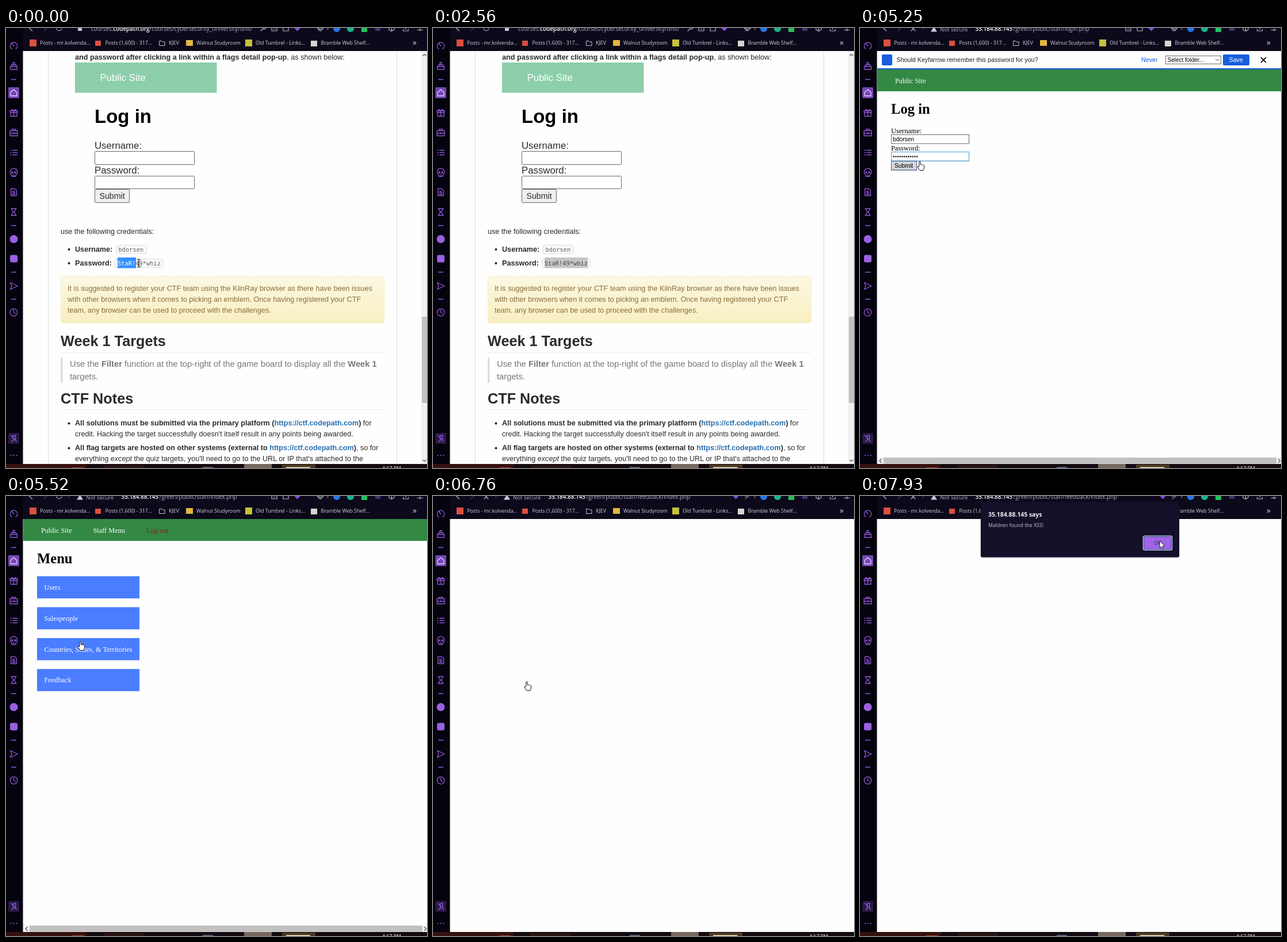
Recreate the animation shown at these times as an HTML page. Size 732x765 px, loop 8000 ms.

```html
<!DOCTYPE html>
<html lang="en">
<head>
<meta charset="utf-8">
<title>Login walkthrough</title>
<style>
html,body{margin:0;width:100%;height:100%;overflow:hidden;background:#fff}
svg{display:block}
.s{font-family:"Liberation Sans",Arial,sans-serif;font-size:12.63px}
.t{font-family:"Liberation Serif",Times,serif;font-size:12.3px}
.o{font-family:"Open Sans",sans-serif;font-size:8.8px}
.m{font-family:"DejaVu Sans Mono",monospace;font-size:10.4px}
.b{font-weight:700}
.h{font-size:25.26px;font-weight:700}
.link{fill:#2a6fb0;font-weight:700}
.line{fill:none;stroke-linecap:round;stroke-linejoin:round}
.box{fill:#fff;stroke:#6a6a6a}

/* Hard switches: one 8 s loop, percent = ms / 80 */
.a{animation:8s step-end infinite}
.course{animation-name:course}
.blue{animation-name:blue}
.gray{animation-name:gray}
.insecure{animation-name:insecure}
.login{animation-name:login}
.shift{animation-name:shift}
.bar{animation-name:bar}
.caret{animation-name:caret}
.focus{animation-name:focus}
.sent{animation-name:sent}
.dots{animation-name:dots}
.menu{animation-name:menu}
.site{animation-name:site}
.early{animation-name:early}
.late{animation-name:late}
.hover1{animation-name:hover1}
.hover2{animation-name:hover2}
.idle{animation-name:idle}
.busy{animation-name:busy}
.press{animation-name:press}
.ibeam{animation-name:ibeam}
.arrow{animation-name:arrow}
.hand{animation-name:hand}
@keyframes course{0%{opacity:1}32.75%,100%{opacity:0}}
@keyframes blue{0%{opacity:1}32%,100%{opacity:0}}
@keyframes gray{0%{opacity:0}32%,100%{opacity:1}}
@keyframes insecure{0%{opacity:0}32.75%,100%{opacity:1}}
@keyframes login{0%{opacity:0}32.75%{opacity:1}68.5%,100%{opacity:0}}
@keyframes shift{0%{transform:none}59.625%,100%{transform:translateY(32px)}}
@keyframes bar{0%{opacity:0}60.5%,100%{opacity:1}}
@keyframes caret{0%{opacity:0}42%{opacity:1}48.625%,100%{opacity:0}}
@keyframes focus{0%{opacity:0}42%{opacity:1}58.75%,100%{opacity:0}}
@keyframes sent{0%{opacity:0}58.75%,100%{opacity:1}}
@keyframes dots{0%{opacity:0}50.375%,100%{opacity:1}}
@keyframes menu{0%{opacity:0}68.5%{opacity:1}84.5%,100%{opacity:0}}
@keyframes site{0%{opacity:0}32.75%{opacity:1}84.5%,100%{opacity:0}}
@keyframes early{0%{opacity:1}84.5%,100%{opacity:0}}
@keyframes late{0%{opacity:0}84.5%,100%{opacity:1}}
@keyframes hover1{0%{opacity:0}69.5%{opacity:1}73.75%,100%{opacity:0}}
@keyframes hover2{0%{opacity:0}73.75%,100%{opacity:1}}
@keyframes idle{0%{opacity:1}59.625%{opacity:0}68.5%{opacity:1}84.5%,100%{opacity:0}}
@keyframes busy{0%{opacity:0}59.625%{opacity:1}68.5%{opacity:0}84.5%,100%{opacity:1}}
@keyframes press{0%{opacity:0}98%,100%{opacity:1}}
@keyframes ibeam{0%{opacity:1}15.9%{opacity:0}41.25%{opacity:1}54.4%,100%{opacity:0}}
@keyframes arrow{0%{opacity:0}15.9%{opacity:1}41.25%{opacity:0}88.5%,100%{opacity:1}}
@keyframes hand{0%{opacity:0}54.4%{opacity:1}88.5%,100%{opacity:0}}

/* Continuous motion */
#sel{animation:drag 8s infinite}
@keyframes drag{
  0%{clip-path:inset(0 43.8px 0 0)}
  1%{clip-path:inset(0 43.8px 0 0);animation-timing-function:steps(7,start)}
  6.6875%,100%{clip-path:inset(0 0 0 0)}
}
#dialog{animation:drop 8s linear infinite}
@keyframes drop{
  0%,85.375%{opacity:0;transform:translateY(-20px)}
  87.125%{opacity:.84;transform:translateY(-3px)}
  88%,100%{opacity:1;transform:translateY(0)}
}
#cursor{animation:move 8s linear infinite}
@keyframes move{
  0%,1%{transform:translate(231px,409px)}
  5.875%,8.25%{transform:translate(270px,411px)}
  10.75%,14.875%{transform:translate(271px,412px)}
  20.125%,23.5%{transform:translate(466px,253px)}
  26.875%,36.12%{transform:translate(551px,-20px)}
  36.125%{transform:translate(475px,4px)}
  42%,50.375%{transform:translate(151px,198px)}
  57.5%,62.25%{transform:translate(92px,205px)}
  65.625%,66.4%{transform:translate(104px,231px)}
  68.5%{transform:translate(125px,250px)}
  71.625%{transform:translate(150px,262px)}
  76.125%,77%{transform:translate(176px,327px)}
  80.25%,88%{transform:translate(163px,322px)}
  92.375%,93.125%{transform:translate(392px,160px)}
  99.125%,100%{transform:translate(521px,78px)}
}
</style>
</head>
<body>
<svg width="732" height="765" viewBox="0 0 732 765">
<defs>
  <linearGradient id="alert" x2="0" y2="1"><stop stop-color="#fcf8e3"/><stop offset="1" stop-color="#f8efc0"/></linearGradient>
</defs>
<rect width="732" height="765" fill="#fefefe"/>

<!-- Course page -->
<g class="a course s" fill="#2b2b2b">
  <path d="M73.5 40V758M679.5 40V758" stroke="#ddd"/>
  <text class="b" x="120" y="54.5">and password after clicking a link within a flags detail pop-up<tspan font-weight="400">, as shown below:</tspan></text>
  <rect x="120" y="60" width="246.5" height="52.5" fill="#8dceab"/>
  <text x="163.5" y="92" font-size="16.8" fill="#fff">Public Site</text>
  <text class="b" x="154" y="164.5" font-size="33" fill="#000">Log in</text>
  <g font-size="16.8">
    <text x="154" y="210">Username:</text>
    <text x="154" y="253">Password:</text>
    <rect class="box" x="154.5" y="214.5" width="173" height="23" rx="1"/>
    <rect class="box" x="154.5" y="257.5" width="173" height="22" rx="1"/>
    <rect x="154.5" y="280.5" width="60" height="23" rx="1" fill="#efefef" stroke="#666"/>
    <text x="162.5" y="296.5" font-size="14.2">Submit</text>
  </g>
  <text x="95" y="357.5">use the following credentials:</text>
  <g fill="#222">
    <circle cx="109.5" cy="385" r="2"/><circle cx="109.5" cy="409" r="2"/>
    <circle cx="109.5" cy="687.5" r="2"/><circle cx="109.5" cy="730.5" r="2"/>
  </g>
  <text class="b" x="120" y="389">Username:</text>
  <text class="b" x="120" y="413">Password:</text>
  <g fill="#f9f9f9" stroke="#ddd">
    <rect x="191.5" y="377.5" width="53" height="15" rx="2"/>
    <rect x="189.5" y="401.5" width="84" height="15" rx="2"/>
  </g>
  <g class="m" fill="#666">
    <text x="195.5" y="389">bdorsen</text>
    <text x="194" y="413">StaR!49*whiz</text>
    <g class="a blue"><g id="sel">
      <rect x="194" y="399" width="75.2" height="18.5" fill="#338fff"/>
      <text x="194" y="413" fill="#fff">StaR!49*whiz</text>
    </g></g>
    <g class="a gray">
      <rect x="194" y="399" width="75.2" height="18.5" fill="#c6c6c6"/>
      <text x="194" y="413" fill="#444">StaR!49*whiz</text>
    </g>
  </g>
  <rect x="95.5" y="431.5" width="562" height="81.5" rx="3" fill="url(#alert)" stroke="#f9efc6"/>
  <g fill="#8a6d3b">
    <text x="107" y="457">It is suggested to register your CTF team using the KilnRay browser as there have been issues</text>
    <text x="107" y="476">with other browsers when it comes to picking an emblem. Once having registered your CTF</text>
    <text x="107" y="494.5">team, any browser can be used to proceed with the challenges.</text>
  </g>
  <text class="h" x="95" y="553">Week 1 Targets</text>
  <text class="h" x="95" y="653">CTF Notes</text>
  <path d="M95 564.5H658M95 663.5H658" stroke="#eee"/>
  <rect x="95" y="573" width="3.5" height="44" fill="#ddd"/>
  <g font-size="14.74" fill="#777">
    <text x="111" y="588.5">Use the <tspan class="b">Filter</tspan> function at the top-right of the game board to display all the <tspan class="b">Week 1</tspan></text>
    <text x="111" y="610.5">targets.</text>
  </g>
  <text x="120" y="691"><tspan class="b">All solutions must be submitted via the primary platform (<tspan class="link">https://ctf.codepath.com</tspan>)</tspan> for</text>
  <text x="120" y="709.5">credit. Hacking the target successfully doesn't itself result in any points being awarded.</text>
  <text x="120" y="734"><tspan class="b">All flag targets are hosted on other systems (external to <tspan class="link">https://ctf.codepath.com</tspan>)</tspan>, so for</text>
  <text x="120" y="752.5">everything <tspan font-style="italic">except</tspan> the quiz targets, you'll need to go to the URL or IP that's attached to the</text>
  <rect x="722" y="40" width="10" height="718" fill="#f1f1f1"/>
  <rect x="723" y="502" width="9" height="150" fill="#c1c1c1"/>
  <path class="line" d="M725 48l2.5-2.5 2.5 2.5M725 751l2.5 2.5 2.5-2.5" stroke="#555" stroke-width="1.3"/>
</g>

<!-- Login page -->
<g class="a login t">
  <g class="a bar s" style="font-size:10.7px">
    <rect x="30" y="70" width="702" height="2" fill="#175ddc"/>
    <rect x="38" y="46" width="18" height="19" rx="2" fill="#175ddc"/>
    <text x="63.5" y="59" fill="#222">Should Keyfarrow remember this password for you?</text>
    <text x="489" y="59" fill="#175ddc">Never</text>
    <rect class="box" x="531.5" y="48.5" width="96" height="14"/>
    <text x="534.5" y="59" font-size="10">Select folder...</text>
    <path class="line" d="M618.5 54l2.5 2.5 2.5-2.5" stroke="#333"/>
    <rect x="631" y="46" width="46" height="19" rx="2" fill="#175ddc"/>
    <text x="641.5" y="59" fill="#fff">Save</text>
    <path d="M697 51l9 9M706 51l-9 9" stroke="#222" stroke-width="2"/>
  </g>
  <g class="a shift">
    <rect x="30" y="40" width="702" height="38" fill="#384"/>
    <text x="61" y="64" fill="#fff">Public Site</text>
    <text class="b" x="54" y="117" font-size="24.6">Log in</text>
    <text x="54" y="150.5">Username:</text>
    <text x="54" y="180.5">Password:</text>
    <rect class="box" x="54.5" y="153.5" width="135" height="15.5"/>
    <rect class="box" x="54.5" y="183.5" width="135" height="15.5"/>
    <rect x="54.5" y="199.5" width="44" height="15.5" fill="#e9e9e9" stroke="#777"/>
    <g class="a focus"><rect x="55" y="184" width="134" height="14.5" rx="1" fill="#fff" stroke="#101010" stroke-width="2"/></g>
    <g class="a sent">
      <rect x="54.5" y="183.5" width="135" height="15.5" fill="#fff" stroke="#43a3d8"/>
      <rect x="54.5" y="199.5" width="44" height="15.5" fill="#d5d5d8" stroke="#3f5a9a"/>
    </g>
    <rect class="a caret" x="57" y="186" width="1" height="11"/>
    <path class="a dots" d="M58.7 191.5h41" stroke="#111" stroke-width="2.7" stroke-linecap="round" stroke-dasharray="0 3.68"/>
    <g class="s" style="font-size:10.3px">
      <text x="57" y="165">bdorsen</text>
      <text x="60" y="211">Submit</text>
    </g>
  </g>
</g>

<g class="a site">
  <rect x="30" y="746.5" width="702" height="11.5" fill="#f1f1f1"/>
  <rect x="41" y="747" width="683" height="10.5" fill="#c1c1c1"/>
  <path class="line" d="M37 749.5l-3 3 3 3M727.5 749.5l3 3-3 3" stroke="#555" stroke-width="1.3"/>
</g>

<!-- Menu page -->
<g class="a menu t" fill="#fff">
  <rect x="30" y="40" width="702" height="38" fill="#384"/>
  <text x="61" y="64">Public Site</text>
  <text x="151.5" y="64">Staff Menu</text>
  <text x="244" y="64" fill="#9c1616">Log out</text>
  <text class="b" x="54" y="117" fill="#000" font-size="24.6">Menu</text>
  <g fill="#4a7dff">
    <rect x="54" y="139.5" width="178" height="38.5"/>
    <rect x="54" y="193.3" width="178" height="38.5"/>
    <rect x="54" y="247" width="178" height="38.5"/>
    <rect x="54" y="300.8" width="178" height="38.5"/>
  </g>
  <g class="a hover1">
    <rect x="54" y="247" width="178" height="38.5" fill="#3f6ee0"/>
    <rect x="29.5" y="737.5" width="285" height="21" fill="#fff" stroke="#aaa"/>
    <text class="o" x="36" y="751.5" fill="#444" style="font-size:9.2px">https://35.184.88.145/green/public/staff/countries/index.php</text>
  </g>
  <g class="a hover2">
    <rect x="54" y="300.8" width="178" height="38.5" fill="#3f6ee0"/>
    <rect x="29.5" y="737.5" width="279.5" height="21" fill="#fff" stroke="#aaa"/>
    <text class="o" x="36" y="751.5" fill="#444" style="font-size:9.2px">https://35.184.88.145/green/public/staff/feedback/index.php</text>
  </g>
  <text x="66.5" y="163">Users</text>
  <text x="66.5" y="216.5">Salespeople</text>
  <text x="66.5" y="270.5">Countries, States, &amp; Territories</text>
  <text x="66.5" y="324">Feedback</text>
</g>

<!-- Browser top -->
<rect x="29" width="703" height="40" fill="#0c091b"/>
<g class="line" stroke="#b9b6c6" stroke-width="1.2">
  <path d="M45.5 5l-5-5"/>
  <path d="M66 5l5-5" stroke="#454155"/>
  <path class="a idle" d="M88 1a4.6 4.6 0 0 0 9 0"/>
  <path class="a busy" d="M89 5l7-7M96 5l-7-7"/>
  <path class="a course" d="M443 5l4-4a3 3 0 0 0 5-3"/>
  <g class="a early">
    <path d="M462 0v5h9v-5M465 2h3M482 0v5h9v-5"/>
    <path d="M502 0l4.500 4.500 4.500-4.500" fill="#8a4be0" stroke="#8a4be0"/>
    <path d="M541 0l6 5 5-5"/>
  </g>
  <path class="a late" d="M522.500 0l4 4.500 4-4.500" fill="#8a4be0" stroke="#8a4be0"/>
  <path d="M543 5l9-7M542 0l5 2M559.500 0v3" stroke="#8c889b"/>
  <path d="M666 0v3l4.500 2.500 4.500-2.500v-3M670.500 0v5M690.500 2v3h9v-3M695 0v2M715 3.500h9M720 1v4"/>
</g>
<circle cx="575" cy="1" r="6" fill="#2775e8"/>
<circle cx="599" cy="1" r="6" fill="#14b789"/>
<rect x="618" y="-4" width="10" height="11" rx="1" fill="#25c05c"/>
<rect x="642" y="-4" width="9" height="9" fill="#343a72"/>
<g class="o" fill="#b2afc0" style="font-size:9.9px">
  <g class="a course">
    <rect x="125" y="-3" width="7" height="8" rx="1" fill="#c9c6d6"/>
    <text x="148" y="5">courses.<tspan fill="#fff" font-weight="600">codepath.org</tspan>/courses/cybersecurity_university/unit/</text>
  </g>
  <g class="a insecure">
    <path d="M123 6.500l5.500-9 5.500 9z" fill="#c9c6d6"/>
    <path d="M109.500 0v3" stroke="#55516a"/>
    <text x="139" y="6" font-size="9.6">Not secure</text>
    <text x="200.500" y="5" fill="#fff" font-weight="600">35.184.88.145</text>
  </g>
  <text class="a login" x="266.500" y="5">/green/public/staff/login.php</text>
  <text class="a menu" x="266.500" y="5">/green/public/staff/index.php</text>
  <text class="a late" x="266.500" y="5">/green/public/staff/feedback/index.php</text>
</g>
<rect x="41" y="20" width="12" height="12" fill="#d9503f"/>
<rect x="155" y="22" width="10" height="9" fill="#d9503f"/>
<path class="line" d="M267 22.500h3.500l1.500 1.500h4v6.500h-9z" stroke="#c8c5d4"/>
<rect x="313" y="21" width="12" height="10" fill="#e0b840"/>
<rect x="416" y="20" width="12" height="12" fill="#c5c13a"/>
<rect x="530" y="22" width="11" height="10" fill="#d8d4cf"/>
<g class="o" fill="#d6d4df">
  <text x="59" y="29">Posts - mr.kolvenda...</text>
  <text x="172.500" y="29">Posts (1,600) - 317...</text>
  <text x="283" y="29">KJEV</text>
  <text x="331" y="29">Walnut Studyroom</text>
  <text x="434" y="29">Old Tumbrel - Links...</text>
  <text x="547.500" y="29">Bramble Web Shelf...</text>
  <text x="707" y="30" font-size="14">»</text>
</g>

<!-- Sidebar -->
<rect width="29.5" height="760" fill="#05030d"/>
<g class="line" transform="translate(13.500 0)" stroke="#9158dc" stroke-width="1.3">
  <path d="M-3.500 36.500a6.300 6.300 0 1 1 7 0M-3 27l3 4"/>
  <path d="M-6 72v-5h12v5zM-5 67l1-3h8l1 3M-1.500 64v-4h3v4"/>
  <path d="M-4 89.500h8M-4 343.500h8M-4 424.500h8M-4 471.500h8"/>
  <rect x="-9.5" y="103" width="19" height="19" rx="1.5" fill="#7546b5" stroke="none"/>
  <path d="M-5.500 112l5.500-5 5.500 5v6h-11z" stroke="#e4d2ff"/>
  <path d="M-6.500 144h13v3h-13zM-5.500 147v6.500h11v-6.500M0 144v9.500M0 144c-5-5-6 0 0 0c5-5 6 0 0 0"/>
  <path d="M-6.500 178.500h13v9h-13zM-3 178.500v-2.500h6v2.500M-6.500 183h13M0 182v2"/>
  <path d="M-1.500 212.500h7.500M-1.500 216.500h7.500M-1.500 220.500h7.500M-5.500 212.500h1M-5.500 216.500h1M-5.500 220.500h1" stroke-width="1.6"/>
  <path d="M-3.500 255.500a6.200 6.200 0 1 1 7 0v2.500h-7zM0 253.500v1M-1 258v-1.500M1 258v-1.500"/>
  <g fill="#9158dc" stroke="none"><circle cx="-2.600" cy="251" r="1.800"/><circle cx="2.600" cy="251" r="1.800"/></g>
  <path d="M-5 279.500h7l3 3v9h-10zM-2.500 284h4M-2.500 286.500h5M-2.500 289h5"/>
  <path d="M-4.500 314h9M-4.500 326h9M-3.500 314c0 4 2.500 5 3.500 6c-1 1-3.500 2-3.500 6M3.500 314c0 4-2.500 5-3.500 6c1 1 3.500 2 3.500 6"/>
  <circle cy="367" r="7" fill="#9b60e2" stroke="none"/>
  <rect x="-6.500" y="394.500" width="13" height="13" rx="3" fill="#9b60e2" stroke="none"/>
  <path d="M-6 442.500l12.500 6-12.500 6 2.500-6z"/>
  <circle cy="494.500" r="6.300"/><path d="M0 490.500v4l3 2"/>
  <rect x="-9.5" y="704" width="19" height="19" rx="1.5" fill="#281943" stroke="none"/>
  <path d="M-1 716v-7l4-1v8M-5 708l10 11M-4 718a1.500 1.500 0 1 0 3-2"/>
  <path d="M-5 743h.1M0 743h.1M5 743h.1" stroke-width="2.200"/>
</g>

<!-- Taskbar edge -->
<rect y="758" width="732" height="7" fill="#140b10"/>
<rect y="758" width="140" height="7" fill="#35110f"/>
<rect x="115" y="764" width="20" height="1" fill="#b5482c"/>
<rect x="170" y="760" width="70" height="5" fill="#2c1413"/>
<rect x="342" y="763" width="18" height="2" fill="#526078"/>
<rect x="414" y="758" width="48" height="7" fill="#77695f"/>
<rect x="480" y="759" width="58" height="6" fill="#4c3822"/>
<rect x="487" y="763.500" width="42" height="1.500" fill="#fff4d8"/>
<text class="o" x="654" y="769" fill="#fff">4:17 PM</text>

<!-- Alert -->
<g id="dialog" class="o">
  <rect x="209" y="12" width="347" height="96" rx="4" opacity=".15"/>
  <rect x="210" y="10" width="345" height="96.500" rx="3" fill="#150f29"/>
  <text x="223" y="36" fill="#f1eff8" style="font-size:10.4px" font-weight="700">35.184.88.145 says</text>
  <text x="223" y="54" fill="#c9c5d8">Maldren found the XSS!</text>
  <rect x="492.500" y="69.500" width="50" height="24.500" rx="2.500" fill="#150f29" stroke="#a3d0f2" stroke-width="1.600"/>
  <rect x="494" y="71" width="47" height="21.500" rx="1.500" fill="#b27df8"/>
  <rect class="a press" x="494" y="71" width="47" height="21.500" rx="1.500" fill="#9f65e8"/>
  <text x="517" y="84.500" text-anchor="middle" fill="#35204f">OK</text>
</g>

<!-- Pointer -->
<g id="cursor">
  <g class="a ibeam">
    <path d="M-3-6.500h2.200l.8.800.8-.800h2.200M0-5.700v11.400M-3 6.500h2.200l.8-.8.8.8h2.200M-1.500 3h3" fill="none" stroke="#222" stroke-width="1.100"/>
  </g>
  <path class="a arrow" d="M0 0v12.500l2.900-2.700 2 4.500 2-.9-2-4.400h4z" fill="#fff" stroke="#111" stroke-width=".9"/>
  <path class="a hand" d="M-1.200 10v-8.500q1.200-2 2.400 0v5q1-1 2.200.2q1.200-.8 2.100.4q1.700-.4 2 1.200v4l-1.500 4.200h-6l-4-5.600q-.3-2 1.400-1.300z" fill="#fff" stroke="#111" stroke-linejoin="round"/>
</g>
</svg>
</body>
</html>
```
